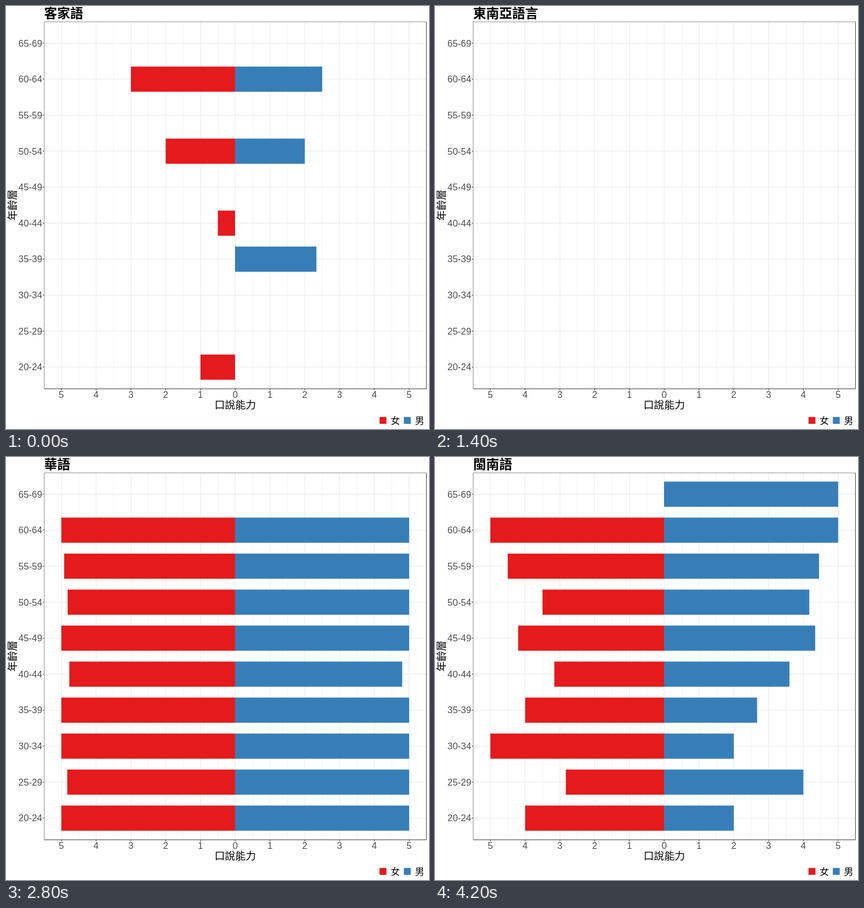
An HTML page that plays this animation: 748x748 px, repeating every 5.6 s.

```html
<!DOCTYPE html>
<html lang="zh-TW">
<head>
<meta charset="utf-8">
<style>
html, body { margin: 0; width: 100%; height: 100%; overflow: hidden; background: #fff; }
svg { display: block; width: 748px; height: 748px; }
text { font-family: "Liberation Sans", "Noto Sans CJK TC", "Noto Sans CJK JP", "Noto Sans CJK", sans-serif; }
.tick { font-size: 16.4px; fill: #4d4d4d; }
.name { font-size: 18.3px; }
.key { font-size: 16.4px; }
.title { font-size: 23px; font-weight: 700; }
</style>
</head>
<body>
<svg id="chart" viewBox="0 0 748 748"></svg>
<script>
const RED = '#e41a1c', BLUE = '#377eb8', GRID = '#ededed', EDGE = '#5a5a5a';
const ZERO = 405.4, UNIT = 61.5, ROW = 63.65, TOP = 65.75, BAR = 44.5, ROWS = 10, MAX = 5;
const BOX = { l: 67.5, t: 28, r: 743.5, b: 676.8 };
const HOLD = 1400;

// Scores by row from the top; rows left out take the base score.
const charts = [
  { title: '客家語', base: 0, women: { 1: 3, 3: 2, 5: .5, 9: 1 }, men: { 1: 2.5, 3: 2, 6: 7 / 3 } },
  { title: '東南亞語言', base: 0, women: {}, men: {} },
  { title: '華語', base: MAX, women: { 0: 0, 2: 4.92, 3: 4.82, 5: 4.77, 8: 4.83 }, men: { 0: 0, 5: 4.8 } },
  { title: '閩南語', base: MAX,
    women: [0, 5, 4.5, 3.5, 4.2, 3.16, 4, 5, 2.83, 4],
    men: [5, 5, 4.45, 4.17, 4.34, 3.6, 2.67, 2, 4, 2] }
];

const svg = document.getElementById('chart');

function add(tag, attrs, parent = svg, content = '') {
  const el = document.createElementNS('http://www.w3.org/2000/svg', tag);
  for (const k in attrs) el.setAttribute(k, attrs[k]);
  el.textContent = content;
  parent.appendChild(el);
  return el;
}
const line = (x1, y1, x2, y2, stroke, width) =>
  add('line', { x1, y1, x2, y2, stroke, 'stroke-width': width });
const rect = (x, y, width, height, fill, parent) =>
  add('rect', { x, y, width, height, fill }, parent);
const label = (x, y, cls, content, anchor = 'start', parent = svg) =>
  add('text', { x, y, class: cls, 'text-anchor': anchor }, parent, content);

const xAt = v => ZERO + v * UNIT;
const yAt = i => TOP + i * ROW;

function bar(row, score, fill, parent) {
  const middle = Math.round(ZERO), end = xAt(score);
  if (score) rect(Math.min(middle, end), yAt(row) - BAR / 2, Math.abs(end - middle), BAR, fill, parent);
}

// Grid
for (let v = .5 - MAX; v < MAX; v++) line(xAt(v), BOX.t, xAt(v), BOX.b, GRID, .7);
for (let i = 0; i < ROWS; i++) line(BOX.l, yAt(i), BOX.r, yAt(i), GRID, 1.3);
for (let v = -MAX; v <= MAX; v++) line(xAt(v), BOX.t, xAt(v), BOX.b, GRID, 1.3);

const scenes = charts.map(({ title, base, women, men }) => {
  const g = add('g', {});
  label(67.5, 20.6, 'title', title, 'start', g);
  for (let i = 0; i < ROWS; i++) {
    bar(i, -(women[i] ?? base), RED, g);
    bar(i, men[i] ?? base, BLUE, g);
  }
  return g;
});

// Frame, ticks and labels
line(BOX.l, BOX.t, BOX.r, BOX.t, '#8c8c8c', 1);
line(BOX.l, BOX.t, BOX.l, BOX.b, '#8c8c8c', 1);
line(BOX.r, BOX.t, BOX.r, BOX.b, EDGE, 1.2);
line(BOX.l, BOX.b, BOX.r + .5, BOX.b, EDGE, 1.2);
for (let i = 0; i < ROWS; i++) {
  const age = 65 - 5 * i;
  line(65, yAt(i), BOX.l, yAt(i), EDGE, 1.2);
  label(64, yAt(i) + 5.8, 'tick', `${age}-${age + 4}`, 'end');
}
for (let v = -MAX; v <= MAX; v++) {
  line(xAt(v), BOX.b, xAt(v), BOX.b + 3, EDGE, 1.2);
  label(xAt(v), 693, 'tick', Math.abs(v), 'middle');
}
label(ZERO, 711.6, 'name', '口說能力', 'middle');
label(0, 0, 'name', '年齡層', 'middle').setAttribute('transform', 'translate(18 352.2) rotate(-90)');

// Legend
[['女', RED], ['男', BLUE]].forEach(([name, fill], i) => {
  const x = 660.5 + 43 * i;
  rect(x, 726.7, 12.2, 12.2, fill);
  label(x + 19.8, 739.2, 'key', name);
});

const start = performance.now();
function draw() {
  const t = Math.max(0, performance.now() - start);
  const now = Math.floor(t / HOLD) % scenes.length;
  scenes.forEach((g, i) => g.setAttribute('visibility', i === now ? 'visible' : 'hidden'));
  requestAnimationFrame(draw);
}
draw();
</script>
</body>
</html>
```
